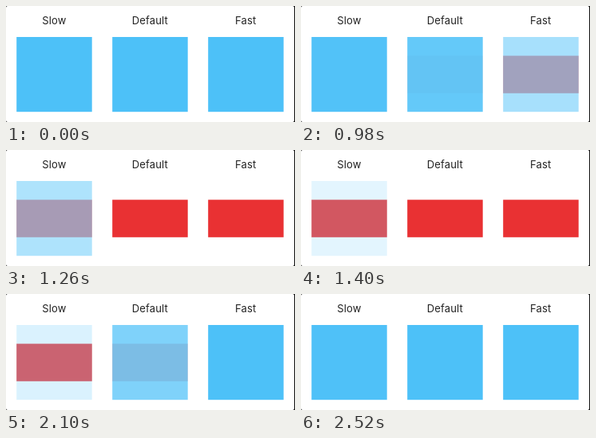
An HTML page that plays this animation: 362x146 px, repeating every 2800 ms.

```html
<!DOCTYPE html>
<html lang="en">
<head>
<meta charset="utf-8">
<title>Animation speeds</title>
<style>
  html, body { margin: 0; width: 100%; height: 100%; overflow: hidden; background: #fff; }
  svg { display: block; }
  text { font: 13px Inter, Roboto, sans-serif; letter-spacing: .15px; text-anchor: middle; fill: #222; }
</style>
</head>
<body>
<svg id="stage" width="362" height="146" viewBox="0 0 362 146">
  <rect width="362" height="146" fill="#111"/>
  <rect width="361" height="146" rx="2" fill="#fff"/>
</svg>
<script>
const LOOP = 2800, STEP = 70;
const TO_RED = 892, TO_BLUE = 1879;
const stage = document.getElementById('stage');

function add(tag, attributes, text = '') {
  const node = document.createElementNS('http://www.w3.org/2000/svg', tag);
  for (const [name, value] of Object.entries(attributes)) node.setAttribute(name, value);
  node.textContent = text;
  return stage.appendChild(node);
}

const panels = [['Slow', 700], ['Default', 350], ['Fast', 175]].map(([label, duration], i) => {
  const x = 13.2 + i * 120;
  add('text', { x: 60.3 + i * 120, y: 22.7 }, label);
  const red = add('rect', { x, y: 62.6, width: 94.5, height: 47.2, fill: '#e93133' });
  const blue = add('rect', { x, y: 39, width: 94.5, height: 94.2, fill: '#4dc1f8' });
  return { duration, red, blue };
});

// cubic-bezier(.42, 0, .58, 1), solved for x by bisection
function easeInOut(x) {
  if (x <= 0) return 0;
  if (x >= 1) return 1;
  let low = 0, high = 1;
  for (let i = 0; i < 24; i++) {
    const u = (low + high) / 2, v = 1 - u;
    if (1.26 * v * v * u + 1.74 * v * u * u + u ** 3 < x) low = u;
    else high = u;
  }
  return low * low * (3 - 2 * low);
}

function draw(now) {
  const time = Math.floor(now % LOOP / STEP) * STEP;
  for (const { duration, red, blue } of panels) {
    const progress = easeInOut((time - TO_RED) / duration) - easeInOut((time - TO_BLUE) / duration);
    const fade = 1 - progress;
    blue.setAttribute('opacity', fade);
    red.setAttribute('opacity', 1 - fade ** 1.3);
  }
}

const start = performance.now();
function tick() {
  draw(performance.now() - start);
  requestAnimationFrame(tick);
}
tick();
</script>
</body>
</html>
```
